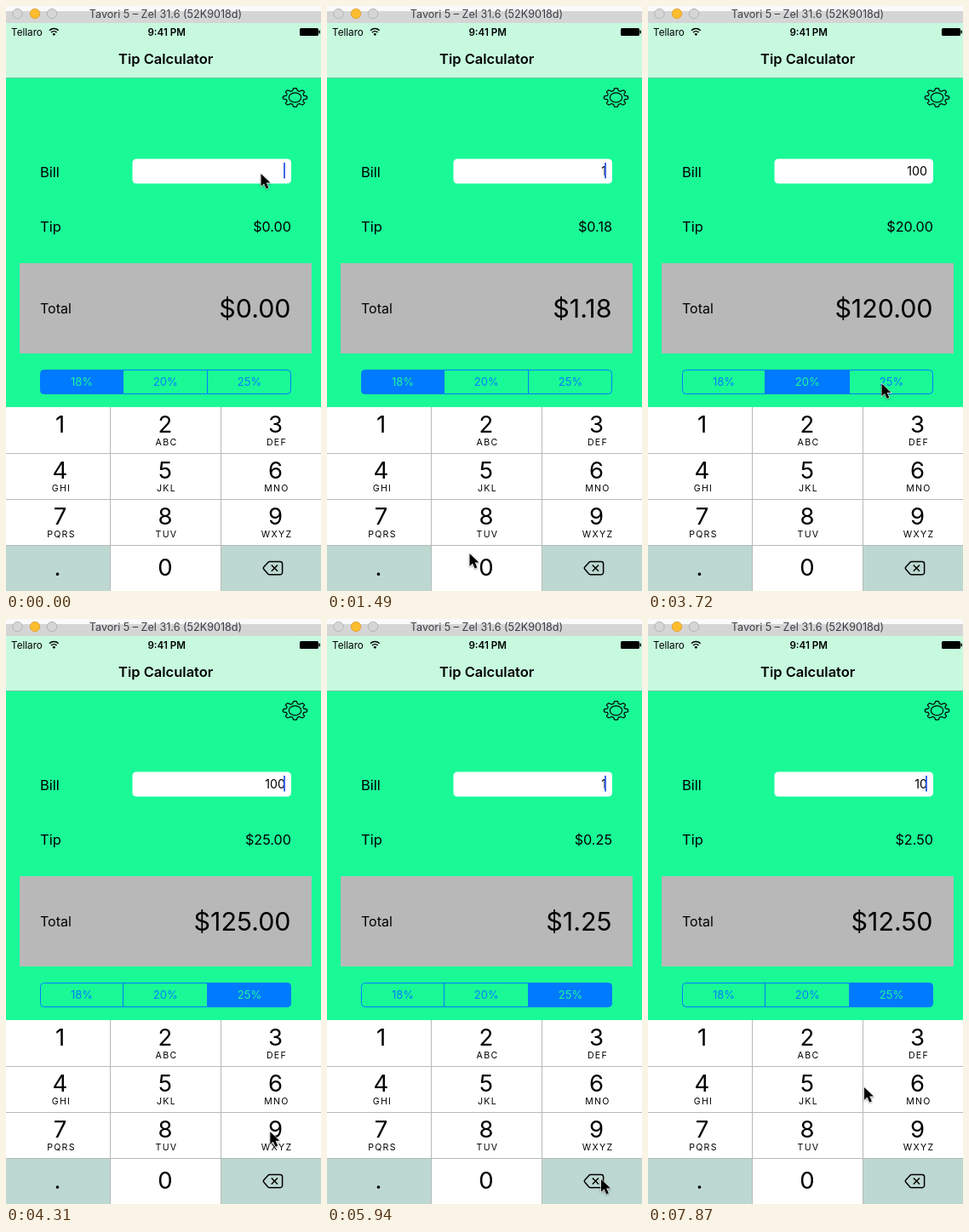
An HTML page for the animation above (8000 ms loop, 370x687 px).

```html
<!DOCTYPE html>
<html lang="en">
<head>
<meta charset="utf-8">
<title>Tip Calculator</title>
<style>
html, body { margin: 0; width: 100%; height: 100%; overflow: hidden; }
svg { display: block; width: 370px; height: 687px; font-family: Inter, "Liberation Sans", sans-serif; }
.mid { text-anchor: middle; }
.end { text-anchor: end; }
.line { fill: none; stroke: #000; }
</style>
</head>
<body>
<svg id="stage" viewBox="0 0 370 687"></svg>
<script>
const LOOP = 8000, STEP = 148.3;
const BLUE = '#007aff', GREEN = '#19fa97', DIM = '#bdd8d1';
const stage = document.getElementById('stage');

function add(tag, attrs, text = '') {
  const el = document.createElementNS('http://www.w3.org/2000/svg', tag);
  for (const k in attrs) el.setAttribute(k, attrs[k]);
  el.textContent = text;
  return stage.appendChild(el);
}
const rect = (x, y, width, height, fill, more) => add('rect', { x, y, width, height, fill, ...more });
const label = (text, x, y, size, more) => add('text', { x, y, 'font-size': size, ...more }, text);
const path = (d, more) => add('path', { d, ...more });
const mid = { class: 'mid' }, end = { class: 'end' };

// Window title bar
rect(0, 0, 370, 687, GREEN);
rect(0, 0, 370, 6, '#fafafa');
rect(0, 6, 370, 14, '#d5d5d5');
[[13.5, '#d6d6d6', '#b4b4b4'], [34, '#fdbd2f', '#e2a438'], [54, '#d6d6d6', '#b4b4b4']]
  .forEach(([cx, fill, stroke]) => add('circle', { cx, cy: 9, r: 5.7, fill, stroke }));
label('Tavori 5 – Zel 31.6 (52K9018d)', 187.5, 14, 12.6, { ...mid, fill: '#3d3d45' });

// Status and navigation bars
rect(0, 20, 370, 64, '#c7f9df');
rect(0, 84, 370, 1, '#70c79f');
label('Tellaro', 6, 34.5, 11.7);
path('M51 28.7a7.6 7.6 0 0 1 10.6 0M53 31a4.8 4.8 0 0 1 6.6 0', { class: 'line', 'stroke-width': 1.6 });
path('M56.3 35l-1.9-2.1a2.8 2.8 0 0 1 3.8 0z');
label('9:41 PM', 188.7, 34.5, 11.6, { ...mid, 'font-weight': 600 });
rect(345, 26, 22, 9, '#000', { rx: 1.5 });
rect(367.5, 28.5, 1.5, 4, '#000', { rx: .7 });
label('Tip Calculator', 187.7, 68, 16.5, { ...mid, 'font-weight': 600 });

// Settings gear
let gear = '';
for (let i = 0; i < 128; i++) {
  const a = i * Math.PI / 64, r = 9.6 + 1.4 * Math.tanh(2.5 * Math.cos(8 * a));
  gear += (i ? 'L' : 'M') + (339.5 + 1.29 * r * Math.cos(a)).toFixed(2) + ' ' + (107.5 + r * Math.sin(a)).toFixed(2);
}
path(gear + 'z', { class: 'line', 'stroke-width': 1.2, 'stroke-linejoin': 'round' });
add('ellipse', { cx: 339.5, cy: 107.5, rx: 7.2, ry: 5.6, class: 'line', 'stroke-width': 1.2 });

// Amounts
rect(148.5, 179.5, 186.5, 29, '#fff', { rx: 4.5 });
rect(16, 302, 343, 106, '#b8b8b8');
label('Bill', 40, 200.5, 16.5);
label('Tip', 40, 265, 16.5);
label('Total', 40, 361, 16);
const bill = label('', 328, 199, 14.2, end);
const tip = label('', 335, 265, 16.2, end);
const total = label('', 334.5, 366, 30.4, end);
const caret = rect(326, 184, 2, 18.5, '#3f66e8');

// Rate selector
const rates = [18, 20, 25];
const fills = [
  path('M137.5 427.5V455.5H44.5a4 4 0 0 1-4-4V431.5a4 4 0 0 1 4-4z'),
  rect(137.5, 427.5, 99, 28),
  path('M236.5 427.5V455.5H330.5a4 4 0 0 0 4-4V431.5a4 4 0 0 0-4-4z')
];
fills.forEach(el => el.setAttribute('stroke', BLUE));
const names = rates.map((r, i) => label(r + '%', [89, 187.3, 286][i], 446, 13, mid));

// Keypad
rect(0, 471, 370, 216, '#fff');
const cols = [[0, 122], [123, 129], [253, 117]];
const centers = [63.5, 187, 316.5];
const letters = ['', 'ABC', 'DEF', 'GHI', 'JKL', 'MNO', 'PQRS', 'TUV', 'WXYZ'];
const keys = {};
['1', '2', '3', '4', '5', '6', '7', '8', '9', '.', '0', 'del'].forEach((name, i) => {
  const c = i % 3, row = Math.floor(i / 3), y = 471 + row * 54;
  const fill = name === '.' || name === 'del' ? DIM : '#fff';
  keys[name] = { fill, el: rect(cols[c][0], y + (row ? 1 : 0), cols[c][1], row ? 53 : 54, fill) };
  if (name === 'del') return;
  label(name, name === '.' ? 60.5 : centers[c], row < 3 ? y + 29.5 : y + 36, 27.5, mid);
  if (letters[i]) label(letters[i], centers[c] + 1.5, y + 45, 10.6, { ...mid, 'letter-spacing': 1.3 });
});
[525, 579, 633].forEach(y => rect(0, y, 370, 1, '#b5bab8'));
[122, 252].forEach(x => rect(x, 471, 1, 216, '#b5bab8'));
path('M309.5 652.5H322a2.6 2.6 0 0 1 2.6 2.6V665.2a2.6 2.6 0 0 1-2.6 2.6H309.5q-1 0-1.8-.9l-5-5.6q-1-1.1 0-2.2l5-5.7q.8-.9 1.8-.9zM311.8 656.5l7.2 7.2m0-7.2l-7.2 7.2',
  { class: 'line', 'stroke-width': 1.5, 'stroke-linejoin': 'round' });

const cursor = path('M0 0V14.8L3.5 11.6 6.2 17.4 8.9 16.2 6.2 10.6H11z', {
  fill: '#000', stroke: '#fff', 'stroke-width': 1.1, 'paint-order': 'stroke',
  style: 'filter:drop-shadow(0 1px 1px rgba(0,0,0,.35))'
});

// Timelines, counted in steps
const typed = [[0, ''], [8, '1'], [11, '10'], [13, '100'], [31, '10'], [32, '1'], [50, '10']];
const chosen = [[0, 0], [20, 1], [26, 2]];
const pressed = { 8: '1', 30: 'del', 32: 'del', 50: '0' };
const hidden = [[3, 5], [18, 19], [24, 26], [38, 39], [44, 46]];
const moves = [
  [1, 299.5, 197], [7, 87.5, 502], [8, 80, 502], [9, 148, 624], [11, 187, 662], [15, 187, 662],
  [16, 193.5, 559.5], [19, 188, 443], [23, 190, 443], [25, 274.5, 443.5], [27, 277, 443],
  [30, 322, 658], [41, 322, 658], [43, 306, 641], [47, 299.5, 633], [50, 230, 662],
  [51, 230, 662], [53, 254, 550]
];

const at = (list, n) => list.filter(e => e[0] <= n).pop()[1];

function place(n) {
  const i = moves.findIndex(m => m[0] >= n);
  if (i < 1) return moves[i < 0 ? moves.length - 1 : 0].slice(1);
  const [a, x0, y0] = moves[i - 1], [b, x1, y1] = moves[i];
  const u = (n - a) / (b - a), k = u * u * (3 - 2 * u);
  return [x0 + (x1 - x0) * k, y0 + (y1 - y0) * k];
}

function draw(now) {
  const n = Math.floor(now % LOOP / STEP);
  const text = at(typed, n), pick = at(chosen, n);
  const extra = text * rates[pick] / 100;
  bill.textContent = text;
  tip.textContent = '$' + extra.toFixed(2);
  total.textContent = '$' + (+text + extra).toFixed(2);
  caret.setAttribute('opacity', hidden.some(([a, b]) => n >= a && n <= b) ? 0 : 1);
  fills.forEach((el, i) => el.setAttribute('fill', i === pick ? BLUE : GREEN));
  names.forEach((el, i) => el.setAttribute('fill', i === pick ? GREEN : BLUE));
  for (const k in keys) {
    const { el, fill } = keys[k];
    el.setAttribute('fill', pressed[n] !== k ? fill : fill === DIM ? '#fff' : DIM);
  }
  cursor.setAttribute('transform', `translate(${place(n)})`);
  requestAnimationFrame(() => draw(performance.now() - start));
}
const start = performance.now();
draw(0);
</script>
</body>
</html>
```
